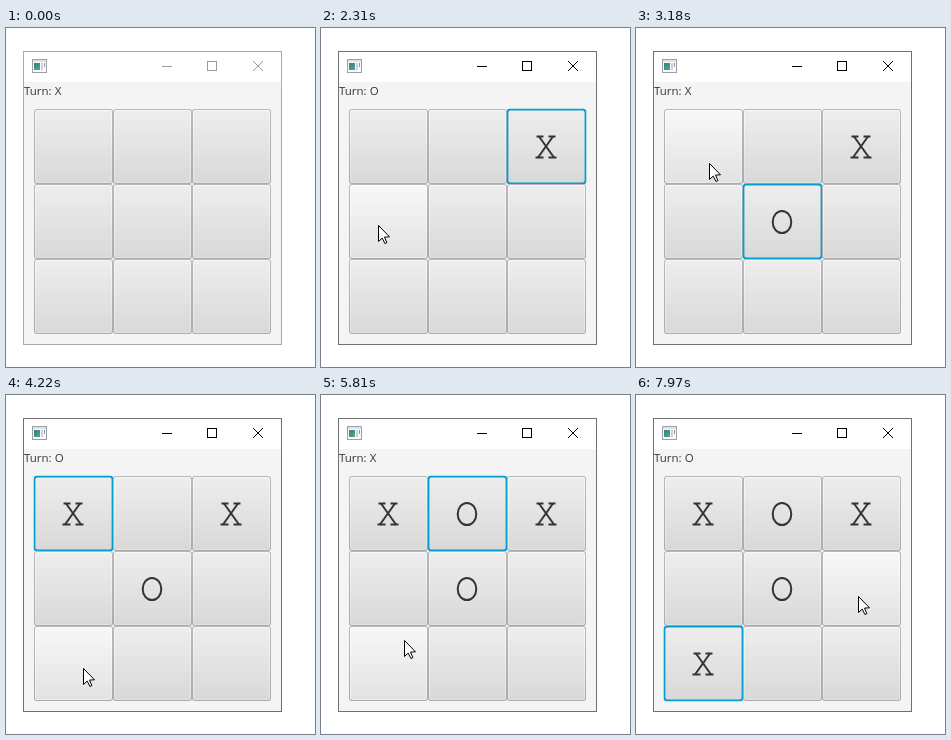
An HTML page with a canvas that plays this animation: 309x339 px, repeating every 8000 ms.

```html
<!DOCTYPE html>
<html lang="en">
<head>
<meta charset="utf-8">
<title>Tic-tac-toe</title>
<style>
  html, body { margin: 0; width: 100%; height: 100%; overflow: hidden; background: #fff; }
  canvas { display: block; width: 309px; height: 339px; }
</style>
</head>
<body>
<canvas id="stage" width="309" height="339"></canvas>
<script>
const ctx = document.getElementById('stage').getContext('2d');
const LOOP = 8000, STEP = 50;
const CELL_W = 79, CELL_H = 75, GRID_X = 28, GRID_Y = 81;
const ACTIVATE = 1640;

const clicks = [
  { down: 1640, up: 1740, cell: 2, mark: 'X' },
  { down: 2780, up: 2880, cell: 4, mark: 'O' },
  { down: 3700, up: 3800, cell: 0, mark: 'X' },
  { down: 4770, up: 4870, cell: 1, mark: 'O' },
  { down: 6830, up: 6950, cell: 6, mark: 'X' }
];

// Pointer tip: time, x, y
const path = [
  [0, 312, 350], [250, 312, 350], [300, 300, 317], [500, 270, 144],
  [720, 270, 144], [970, 220, 111],
  [1840, 220, 111], [2310, 57, 197], [2460, 72, 211], [2660, 132, 198],
  [2880, 132, 198], [3180, 73, 135],
  [3900, 73, 135], [4050, 66, 196], [4220, 77, 273], [4320, 82, 280], [4670, 131, 136],
  [4920, 131, 136], [5040, 133, 133], [5560, 88, 222], [6110, 80, 259],
  [7520, 80, 259], [7970, 222, 201], [LOOP, 222, 201]
];

function slope(i, axis) {
  return (path[i + 1][axis] - path[i][axis]) / (path[i + 1][0] - path[i][0]);
}

function tangent(i, axis) {
  if (i === 0 || i === path.length - 1) return 0;
  const a = slope(i - 1, axis), b = slope(i, axis);
  return a * b > 0 ? 2 * a * b / (a + b) : 0;
}

function pointerAt(time) {
  let i = 0;
  while (i < path.length - 2 && time >= path[i + 1][0]) i++;
  const start = path[i][0], span = path[i + 1][0] - start;
  const u = Math.floor((time - start) / STEP) * STEP / span;
  const along = axis => {
    const a = path[i][axis], b = path[i + 1][axis];
    const ease = u * u * (3 - 2 * u);
    const lead = u * (1 - u) * (1 - u) * tangent(i, axis);
    const trail = u * u * (u - 1) * tangent(i + 1, axis);
    return Math.round(a + (b - a) * ease + span * (lead + trail));
  };
  return { x: along(1), y: along(2) };
}

function rect(x, y, w, h, color) {
  ctx.fillStyle = color;
  ctx.fillRect(x, y, w, h);
}

function line(points, color, width = 1) {
  ctx.beginPath();
  points.forEach(([x, y], i) => i ? ctx.lineTo(x, y) : ctx.moveTo(x, y));
  ctx.strokeStyle = color;
  ctx.lineWidth = width;
  ctx.stroke();
}

function panel(x, y, w, h, inset, radius, top, bottom = top) {
  const fill = ctx.createLinearGradient(0, y, 0, y + h);
  fill.addColorStop(0, top);
  fill.addColorStop(1, bottom);
  ctx.beginPath();
  ctx.roundRect(x + inset, y + inset, w - 2 * inset, h - 2 * inset, radius);
  ctx.fillStyle = fill;
  ctx.fill();
}

function drawIcon() {
  rect(26, 31, 15, 14, '#9aa0a4');
  rect(27, 32, 13, 2, '#dfe3e8');
  rect(27, 34, 13, 10, '#fafafa');
  const fill = ctx.createLinearGradient(28, 35, 33, 42);
  fill.addColorStop(0, '#3a7a96');
  fill.addColorStop(1, '#53a481');
  rect(28, 35, 6, 7, fill);
  rect(35, 35, 2, 7, '#c9d2dc');
  rect(38, 35, 1, 4, '#8b98a8');
}

function drawWindow(active) {
  const ink = active ? '#000' : '#999';
  rect(17, 23, 259, 294, active ? '#707070' : '#aaa');
  rect(18, 24, 257, 30, '#fff');
  rect(18, 54, 257, 262, '#f4f4f4');
  drawIcon();
  rect(156, 38, 10, 1, ink);
  ctx.strokeStyle = ink;
  ctx.lineWidth = 1;
  ctx.strokeRect(201.5, 33.5, 9, 9);
  line([[247, 33], [257, 43]], ink);
  line([[257, 33], [247, 43]], ink);
}

function drawMark(mark, x, y) {
  const ink = '#333';
  if (mark === 'O') {
    ctx.beginPath();
    ctx.ellipse(x, y, 9.3, 11.1, 0, 0, 2 * Math.PI);
    ctx.strokeStyle = ink;
    ctx.lineWidth = 2;
    ctx.stroke();
    return;
  }
  for (const side of [-1, 1]) {
    line([[x + side * 7, y - 10.5], [x - side * 8, y + 10.5]], ink, 2);
    line([[x + side * 2.5, y - 10.5], [x + side * 9.5, y - 10.5]], ink, 2);
    line([[x + side * 2.5, y + 10.5], [x + side * 10.5, y + 10.5]], ink, 2);
  }
}

function drawCell(index, mark, { focus, hover, pressed }) {
  const x = GRID_X + index % 3 * CELL_W, y = GRID_Y + Math.floor(index / 3) * CELL_H;
  const box = [x, y, CELL_W, CELL_H];
  const [top, bottom] = pressed ? ['#dedede', '#cbcbcb']
    : hover ? ['#f8f8f8', '#e2e2e2'] : ['#eeeeee', '#d8d8d8'];
  if (focus) {
    panel(...box, -0.3, 3, hover && !pressed ? '#3f93ae' : '#039ed3');
    panel(...box, 1.4, 2, top, bottom);
  } else {
    panel(...box, 0, 3, '#b8b8b8', '#ababab');
    panel(...box, 1, 2, hover ? '#ffffff' : '#f9f9f9', hover ? '#ececec' : '#e2e2e2');
    panel(...box, 2, 1, top, bottom);
  }
  if (mark) drawMark(mark, x + 39, y + 38);
}

function drawPointer({ x, y }) {
  const outline = [[0, 0], [0, 16], [3.7, 12.6], [6.4, 18], [8.4, 17.2], [6, 11.6], [11, 11.3]];
  ctx.beginPath();
  outline.forEach(([dx, dy]) => ctx.lineTo(x + dx + 0.5, y + dy + 0.5));
  ctx.closePath();
  ctx.fillStyle = '#fff';
  ctx.fill();
  ctx.strokeStyle = '#000';
  ctx.lineWidth = 1;
  ctx.stroke();
}

function cellUnder({ x, y }) {
  const col = Math.floor((x - GRID_X) / CELL_W), row = Math.floor((y - GRID_Y) / CELL_H);
  return col >= 0 && col < 3 && row >= 0 && row < 3 ? row * 3 + col : -1;
}

function draw(time) {
  const pointer = pointerAt(time), hovered = cellUnder(pointer);
  const placed = clicks.filter(c => time >= c.up);
  const latest = clicks.filter(c => time >= c.down).pop();
  const pressing = Boolean(latest && time < latest.up);

  rect(0, 0, 309, 339, '#fff');
  drawWindow(time >= ACTIVATE);
  ctx.fillStyle = '#333';
  ctx.font = '11.5px "Open Sans", "Noto Sans", sans-serif';
  ctx.fillText('Turn: ' + (placed.length % 2 ? 'O' : 'X'), 18, 67);

  for (let i = 0; i < 9; i++) {
    const move = placed.find(c => c.cell === i);
    const focus = Boolean(latest && latest.cell === i);
    drawCell(i, move && move.mark, { focus, hover: hovered === i, pressed: pressing && focus });
  }
  if (pressing) {
    ctx.beginPath();
    ctx.arc(pointer.x, pointer.y, 12, 0, 2 * Math.PI);
    ctx.fillStyle = '#e9e768';
    ctx.fill();
  }
  drawPointer(pointer);
}

const began = performance.now();
function tick() {
  draw((performance.now() - began) % LOOP);
  requestAnimationFrame(tick);
}
tick();
</script>
</body>
</html>
```
